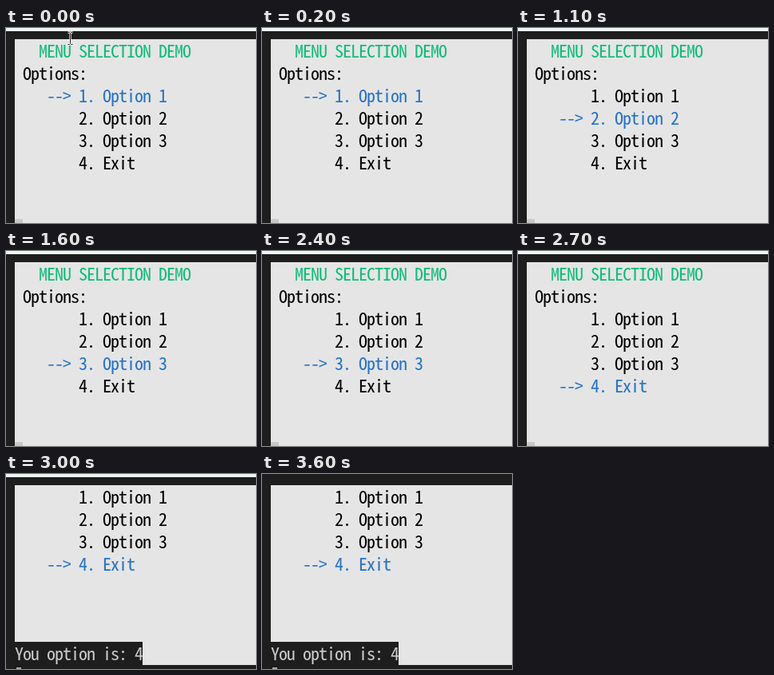
Animation of 313x244 px, one loop 3.8 s. Source, as an HTML page:

```html
<!DOCTYPE html>
<html lang="en">
<head>
<meta charset="utf-8">
<title>Menu selection demo</title>
<style>
  :root { --dark: #1e1e1e; --paper: #e5e5e5; --blue: #2472c8; --green: #0dbc79; }
  html, body { margin: 0; width: 100%; height: 100%; overflow: hidden; background: var(--dark); }
  .stage { position: relative; width: 313px; height: 244px; overflow: hidden; background: var(--dark); }
  .stage div, .stage svg { position: absolute; }
  .stage * { animation: 3800ms step-end infinite; }

  .strip { left: 0; top: 0; width: 313px; height: 4px; background: #edf6f2; animation-name: strip; }
  .screen { left: 11px; top: 14px; width: 302px; height: 230px; overflow: hidden; background: var(--paper); }

  .row {
    left: calc(var(--col) * 10px);
    top: calc(var(--line) * 28px);
    height: 28px;
    overflow: hidden;
    font: 22px/26px "Noto Sans Mono CJK JP", "Noto Sans Mono CJK SC", "Noto Sans Mono CJK KR", monospace;
    letter-spacing: -1px;
    white-space: pre;
    color: #000;
  }
  .lines { left: 0; top: 0; animation-name: scroll; }
  .title { color: var(--green); }
  .arrow { color: var(--blue); animation-name: arrow; }
  .o1 { animation-name: pick1; }
  .o2 { animation-name: pick2; }
  .o3 { animation-name: pick3; }
  .o4 { animation-name: pick4; }

  .block { left: 0; top: 225px; width: 10px; height: 5px; background: #c8c8c8; animation-name: block; }
  .result { left: 0; top: 0; width: 302px; height: 230px; opacity: 0; animation-name: result; }
  .answer { left: 0; top: 196px; width: 160px; height: 29px; background: var(--dark); }
  .answer .row { color: #ccc; }
  .below { left: 0; top: 225px; width: 302px; height: 5px; background: var(--dark); }
  .hint { left: 2px; top: 228px; width: 6px; height: 2px; background: #aaa; }
  .mouse { left: 76px; top: 4px; width: 9px; height: 18px; animation-name: mouse; }

  @keyframes strip { 0% { background: #edf6f2 } 94.73%, 100% { background: var(--dark) } }
  @keyframes scroll { 0% { transform: none } 78.94%, 100% { transform: translateY(-56px) } }
  @keyframes arrow {
    0% { transform: none }
    28.94%, 55.26% { transform: translateY(28px) }
    42.1%, 63.15% { transform: translateY(56px) }
    68.42%, 100% { transform: translateY(84px) }
  }
  @keyframes pick1 { 0% { color: var(--blue) } 28.94%, 100% { color: #000 } }
  @keyframes pick2 { 0%, 42.1%, 63.15%, 100% { color: #000 } 28.94%, 55.26% { color: var(--blue) } }
  @keyframes pick3 { 0%, 55.26%, 68.42%, 100% { color: #000 } 42.1%, 63.15% { color: var(--blue) } }
  @keyframes pick4 { 0% { color: #000 } 68.42%, 100% { color: var(--blue) } }
  @keyframes block { 0%, 71.05% { opacity: 1 } 68.42%, 78.94%, 100% { opacity: 0 } }
  @keyframes result { 0% { opacity: 0 } 78.94%, 100% { opacity: 1 } }
  @keyframes mouse {
    0% { transform: none; opacity: 1 }
    2.63% { transform: translate(-56px, -6px); opacity: 1 }
    5.26%, 100% { transform: translate(-56px, -6px); opacity: 0 }
  }
</style>
</head>
<body>
<div class="stage">
  <div class="strip"></div>
  <div class="screen">
    <div class="lines">
      <div class="row title" style="--col:3;--line:0">MENU SELECTION DEMO</div>
      <div class="row" style="--col:1;--line:1">Options:</div>
      <div class="row arrow" style="--col:4;--line:2">--&gt;</div>
      <div class="row o1" style="--col:8;--line:2">1. Option 1</div>
      <div class="row o2" style="--col:8;--line:3">2. Option 2</div>
      <div class="row o3" style="--col:8;--line:4">3. Option 3</div>
      <div class="row o4" style="--col:8;--line:5">4. Exit</div>
    </div>
    <div class="block"></div>
    <div class="result">
      <div class="answer"><div class="row" style="--col:0;--line:0">You option is: 4</div></div>
      <div class="below"></div>
      <div class="hint"></div>
    </div>
  </div>
  <svg class="mouse" viewBox="0 0 9 18" fill="none">
    <defs>
      <path id="beam" d="M1.5 1.5H3.5L4.5 2.5L5.5 1.5H7.5M4.5 2.5V15.5M1.5 16.5H3.5L4.5 15.5L5.5 16.5H7.5"/>
    </defs>
    <use href="#beam" stroke="#fff" stroke-width="2.4"/>
    <use href="#beam" stroke="#222"/>
  </svg>
</div>
</body>
</html>
```
